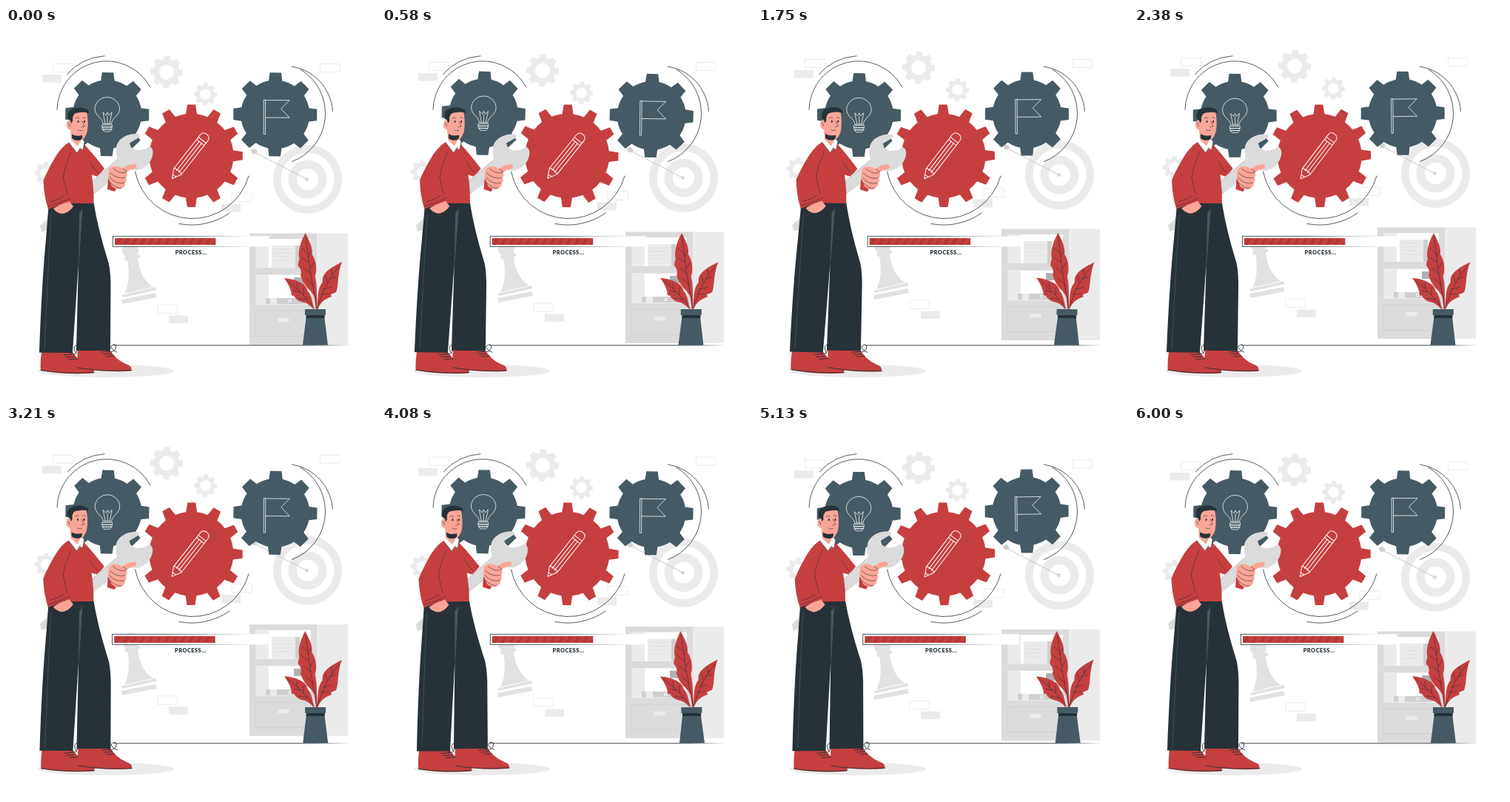
These frames come from a looping animation (500 by 500 pixels, 6.04 s). An HTML page:

```html
<!DOCTYPE html>
<html lang="en">
<head>
<meta charset="utf-8">
<title>Process</title>
<style>
  html, body { margin: 0; width: 100%; height: 100%; overflow: hidden; background: #fff; }
  svg { display: block; width: 100vw; height: 100vh; }
  text { font: 900 7.4px Lato, sans-serif; letter-spacing: .5px; }
  .red { fill: #c53f3f; }
  .slate { fill: #455a64; }
  .dark { fill: #263238; }
  .skin { fill: #fba596; }
  .pale { fill: #ebebeb; }
  .grey { fill: #dbdbdb; }
  .white { fill: #fff; }
  .line { fill: none; stroke: #263238; stroke-width: .9; stroke-linecap: round; stroke-linejoin: round; }
  .thin { stroke-width: .6; }
  .chalk { fill: none; stroke: #fff; stroke-width: .75; stroke-linejoin: round; stroke-linecap: round; }
  .box { fill: none; stroke: #e4e4e4; stroke-width: .7; }
</style>
</head>
<body>
<svg viewBox="0 0 500 500">
  <defs>
    <linearGradient id="fade" gradientUnits="userSpaceOnUse" x1="144" y1="0" x2="356" y2="0">
      <stop offset="0" stop-color="#263238"/>
      <stop offset=".35" stop-color="#263238"/>
      <stop offset=".9" stop-color="#263238" stop-opacity="0"/>
    </linearGradient>
    <linearGradient id="floor" gradientUnits="userSpaceOnUse" x1="145" y1="0" x2="462" y2="0">
      <stop offset=".85" stop-color="#263238"/>
      <stop offset="1" stop-color="#263238" stop-opacity=".1"/>
    </linearGradient>
    <pattern id="stripes" width="11" height="9" patternUnits="userSpaceOnUse" x="147" y="284">
      <rect width="11" height="9" fill="#c53f3f"/>
      <path d="M5 0H10L5 9H0Z" fill="#b23737"/>
    </pattern>
  </defs>

  <ellipse class="pale" cx="135" cy="463.5" rx="92" ry="8.5"/>

  <g id="back">
    <g id="paleGears"></g>
    <path class="pale" d="M49 63h26v10.500h-26zM291 237.500h26v11h-26zM220 388.500h26v10.500h-26z"/>
    <path class="box" d="M63.500 48.500h27v11h-27zM424.500 48.500h26.500v11h-26.500zM305 223h27v11.500h-27zM205 374h26.500v11.500h-26.500zM49 332h27v11.500h-27z"/>

    <circle class="pale" cx="407.500" cy="204.500" r="46.500"/>
    <circle class="white" cx="407.500" cy="204.500" r="36"/>
    <circle class="pale" cx="407.500" cy="204.500" r="26"/>
    <circle class="white" cx="407.500" cy="204.500" r="14.500"/>
    <circle class="grey" cx="406.500" cy="204.500" r="2.500"/>
    <path d="M333 166.500L406.500 204.500M331 164l4 6M334 163l4 6" fill="none" stroke="#c9c9c9"/>
    <path fill="#d0d0d0" d="M331 165l5-2 4 4-2 3-5 0z"/>

    <g fill="#e2e2e2">
      <circle cx="168" cy="300" r="11"/>
      <path d="M160 310l20-4 2 4-21 5zM164 314l14-3c2 18 8 30 20 39l-38 9c7-14 7-30 4-45z"/>
      <path d="M156 361l46-11 2 4-46 10zM156 367l46-9 2 6-47 9z"/>
    </g>

    <path class="pale" d="M419 277.500h43v150.500h-43z"/>
    <path class="grey" d="M329 277.500h91v150.500h-91z"/>
    <path class="white" d="M337 285h75v39h-75zM337 333.500h75v40h-75z"/>
    <path class="pale" d="M337 285h18v39h-18zM337 333.500h18v40h-18zM359 294h32v30h-32z"/>
    <path d="M362 299h26M362 304h26M362 309h20M362 314h26" stroke="#dcdcdc" stroke-width=".8"/>
    <path fill="#cfcfcf" d="M391 294h6v30h-6zM351 365h6v8h-6zM366 365h38v8h-38z"/>
    <path fill="#b0b0b0" d="M389 337h14v10h-14z"/>
    <path class="pale" d="M398 298h5v26h-5zM357 365h9v8h-9z"/>
    <circle class="white" cx="383.500" cy="369" r="2.200"/>
    <circle cx="383.500" cy="369" r="1" fill="#aaa"/>
    <path d="M337.500 382.500h74v34h-74z" fill="none" stroke="#cdcdcd" stroke-width=".7"/>
    <rect class="pale" x="367.500" y="392" width="15" height="5.500"/>
  </g>

  <rect x="145" y="428.400" width="317" height=".9" fill="url(#floor)"/>

  <g id="bar">
    <rect class="white" x="144.500" y="281.300" width="211" height="14"/>
    <rect x="144.500" y="281.300" width="211" height="14" fill="none" stroke="url(#fade)" stroke-width=".8"/>
    <rect x="147" y="284" width="136.500" height="9" fill="url(#stripes)"/>
    <text class="dark" x="250.300" y="306" text-anchor="middle">PROCESS...</text>
  </g>

  <g id="gears">
    <g id="wheels"></g>
    <path class="chalk" d="M131 129c0-7-11-10-11-20a16.800 16.800 0 0 1 33.500 0c0 10-11 13-11 20zM130 131h13.500v3h-13.500zM130.500 134h12.500v3h-12.500zM131 137h11.500l-2 3h-7.500zM134 129l-3-15 4 4 2-4 2 4 4-4-3 15M137 119v10"/>
    <path class="chalk" d="M348.500 97h2v46.500h-2zM350.500 97.500h32.500l-11.500 11.500 11.500 12h-32.500"/>
    <g class="chalk" transform="translate(224.500 203.500) rotate(-52)" style="stroke-width:1">
      <path d="M0 0L12-6.500H70Q76-6.500 76 0T70 6.500H12ZM12-6.500Q15-4 12.500-2 16 0 12.500 2 15 4 12 6.500M13-2H62M13 2H62M62-6.500V6.500M66-6.500V6.500M5-2.700V2.700"/>
    </g>
  </g>

  <path class="line" d="M69 110A67 67 0 0 1 195 80M83 62A73.500 73.500 0 0 1 133 37.800M398 56A69.500 69.500 0 0 1 386.500 180.500M386.500 52A65 65 0 0 1 441.500 112M174.500 194A79 79 0 0 0 328 200M234 264.500A88 88 0 0 0 302 250" style="stroke-width:.8"/>

  <g id="plant">
    <path class="red" d="M404.500 277C398 289 394 302 396.500 312L395 318Q394 322 397 324 400 330 398 334 401 344 407 351 414 357 417 364L419 381H421L420 362C420 350 419 342 417.500 336L419 329C420 318 416 309 413.500 306 415 296 409 286 404.500 277Z"/>
    <path class="red" d="M376 338Q392 339 403 347 407 351 408 356 413 360 416 381 409 371 399 370 391 367 389.500 362L386 361.500Q386 352 376 338Z"/>
    <path class="red" d="M454 316C443 322 432 327 428 337L427.500 344C422 350 421 361 421 381 424 371 431 366 440 363L439 360 446 357C450 348 447 335 454 316Z"/>
    <path class="line thin" d="M405 282Q410 330 420 378M407 304l-7-6M409 317l-10-7M412 332l-10-8M415 347l-10-8M408 309l4-8M411 325l5-8M380 341Q402 358 417 379M394 353l-1-8M402 361l0-10M398 357l-9-2M407 367l-11-2M450 322Q430 346 421 378M441 334l-1-8M434 344l-2-9M437 339l9-3M429 353l11-3M426 360l10-1"/>
    <path class="slate" d="M404 380h28v8h-28zM406 388h24l5 40.500h-34z"/>
    <path class="dark" d="M406 388h24.500l.4 4h-25.500z"/>
  </g>

  <g id="man">
    <path class="red" d="M104 156Q113 164 133 190L124 201 108 196Z"/>
    <path class="grey" d="M165 164L46 267Q47 271 48 276L58 272 176 180Z"/>
    <path class="grey" d="M149 163C149 150 165 141 180 143.500L181 147 167 155.500 169 161.500 176 165Q186 166 194 160 198 162 198.500 167C199 180 187 194 172 192 157 192 147 178 149 163Z"/>
    <path d="M148 180L118 207" fill="none" stroke="#c4c4c4" stroke-width=".8"/>
    <path class="line thin" d="M112 178Q116 188 124 195"/>

    <path class="red" d="M48 438Q46 455 47 463 80 469 118 466.500 122 460 112 457 100 452 90 438ZM97 434Q96 452 97 459 135 466 169 463.500 172 457 162 454 148 448 139 433Z"/>
    <path class="line" d="M47 462.500Q82 468 119 465.500M97 459Q132 465 170 462.500M78 442l11-1M81 445l12-1M85 448l12-1M129 438l11-1M132 441l11-1M136 444l10-1M88 440Q94 444 97 434 98 428 94 429 90 432 95 440M137 437Q148 440 149 430 147 425 142 430 141 434 150 438"/>
    <path class="dark" d="M58 235L118.500 236Q124 270 137 312 141 322 141.500 345L141 436H95L98 318 90 439 45 438.500Q48 350 54 285Z"/>
    <path d="M61 252Q57 320 52 434M103 243Q101 275 98 318" fill="none" stroke="#455a64" stroke-width=".8"/>
    <path class="slate" d="M99 250l4-5-3 48-2 27z"/>

    <path class="red" d="M89 153L103 153Q110 160 113 178L117 207Q119 222 118.500 237H68Q64 200 73 166 79 157 89 153Z"/>
    <path class="skin" d="M64 244L84 232 91 241Q85 250 76 251 68 250 64 244Z"/>
    <path class="red" d="M86 154Q76 160 68 172 56 192 50.500 206 51 226 57 245L86 234 88 231Q84 226 77 223L75 211Q82 203 85 185Z"/>
    <path class="line thin" d="M88 168Q78 190 77.500 203L83 225M58 241Q72 237 87 230M60 235Q70 233 78 227"/>
    <path class="white" d="M88 149L85 155 96 169 100 163 104 165 106 154 103 150Z"/>
    <path class="line thin" d="M85 155L96 169 100 162 104 165 106 154"/>

    <path class="skin" d="M87 116L109 113Q112 128 109.500 141 106 151 101 152L97 160 88 151 87 138Q81 136 82 129 83 124 87 125Z"/>
    <path class="dark" d="M84 123Q81 112 91 109 102 105 111 111L112 115Q103 112 94 115 89 118 90 126L88 129 87 125ZM89 143Q93 147 103 145 104 150 100 151.500 93 153 89 149Z"/>
    <ellipse class="dark" cx="97.500" cy="126.500" rx="1" ry="1.700"/>
    <ellipse class="dark" cx="106" cy="126.500" rx="1" ry="1.700"/>
    <path class="line thin" d="M94 122q3-2 5 0M104 121q2-1 4 1M103 126l3 7-4 1M97 138q4 2 6 0M84 129q3 0 2 4"/>

    <path class="red" d="M138 204L143 206 149 217 147 221 137 218Z"/>
    <path class="skin" d="M139 191Q143 185 151 187L158 190Q165 183 175 184 179 187 174 190 167 191 163 195 165 199 162 202 164 207 161 209 162 214 157 216 153 221 143 214L138 202Z"/>
    <path class="line thin" d="M145 190Q154 198 162 195M141 196Q151 205 161 202M140 202Q149 212 160 209M141 209Q149 217 156 216M158 190l5 4"/>
  </g>
</svg>
<script>
const $ = id => document.getElementById(id);

// Gear with n tapered teeth: outer radius R, body radius r, tooth widths at top and base.
function gear(cx, cy, R, r, n, top, base, turn, color, hole = 0) {
  const at = (rad, a) => `${(cx + rad * Math.sin(a)).toFixed(2)} ${(cy - rad * Math.cos(a)).toFixed(2)}`;
  const b = base / 2 / r, c = top / 2 / R;
  let d = '';
  for (let i = 0; i < n; i++) {
    const a = turn * Math.PI / 180 + i * 2 * Math.PI / n;
    d += `${i ? `A${r} ${r} 0 0 1 ` : 'M'}${at(r, a - b)}L${at(R, a - c)}L${at(R, a + c)}L${at(r, a + b)}`;
  }
  d += `A${r} ${r} 0 0 1 ${at(r, turn * Math.PI / 180 - b)}Z`;
  return `<path class="${color}" d="${d}"/>` +
    (hole ? `<circle class="white" cx="${cx}" cy="${cy}" r="${hole}"/>` : '');
}

$('paleGears').innerHTML =
  gear(217, 59.5, 22.3, 17.5, 8, 7.5, 9.5, 2, 'pale', 10) +
  gear(269.5, 89.7, 15.7, 12, 8, 5, 7, 2, 'pale', 7.3) +
  gear(54, 196.5, 15.7, 12, 8, 5, 7, 2, 'pale', 7.3);
$('wheels').innerHTML =
  gear(136.7, 116.8, 57, 46.5, 8, 15.5, 18.5, 0.8, 'slate') +
  gear(363.7, 116.8, 57, 46.5, 8, 15.5, 18.5, 0.5, 'slate') +
  gear(250.5, 172.8, 69.5, 57, 12, 11, 15, 0, 'red');

const LOOP = 6040, CYCLE = 6000, LEAD = 35;
const shakeSteps = [0, -1, 2, -4, 4, -4, 4, -4, 2, -1, 0];

// Linear swing 0 -> 1 -> -1 -> 0, in degrees.
const sway = p => p < .25 ? 4 * p : p < .75 ? 2 - 4 * p : 4 * p - 4;

function shake(p) {
  const i = Math.floor(p * 10), f = p * 10 - i;
  return shakeSteps[i] * (1 - f) + shakeSteps[i + 1] * f;
}

const move = (id, x, y) => $(id).setAttribute('transform', `translate(${x} ${y})`);
const turn = (id, deg, x, y) => $(id).setAttribute('transform', `rotate(${deg} ${x} ${y})`);

function draw() {
  const p = (performance.now() % LOOP + LEAD) / CYCLE % 1;
  const half = p * 2 % 1;
  move('back', 0, -10 * (1 - Math.abs(1 - 2 * p)));
  move('bar', shake(half), 0);
  turn('gears', sway(half), 250.5, 151);
  turn('man', sway(p), 121, 287);
  turn('plant', sway(p), 415, 353);
  requestAnimationFrame(draw);
}
draw();
</script>
</body>
</html>
```
